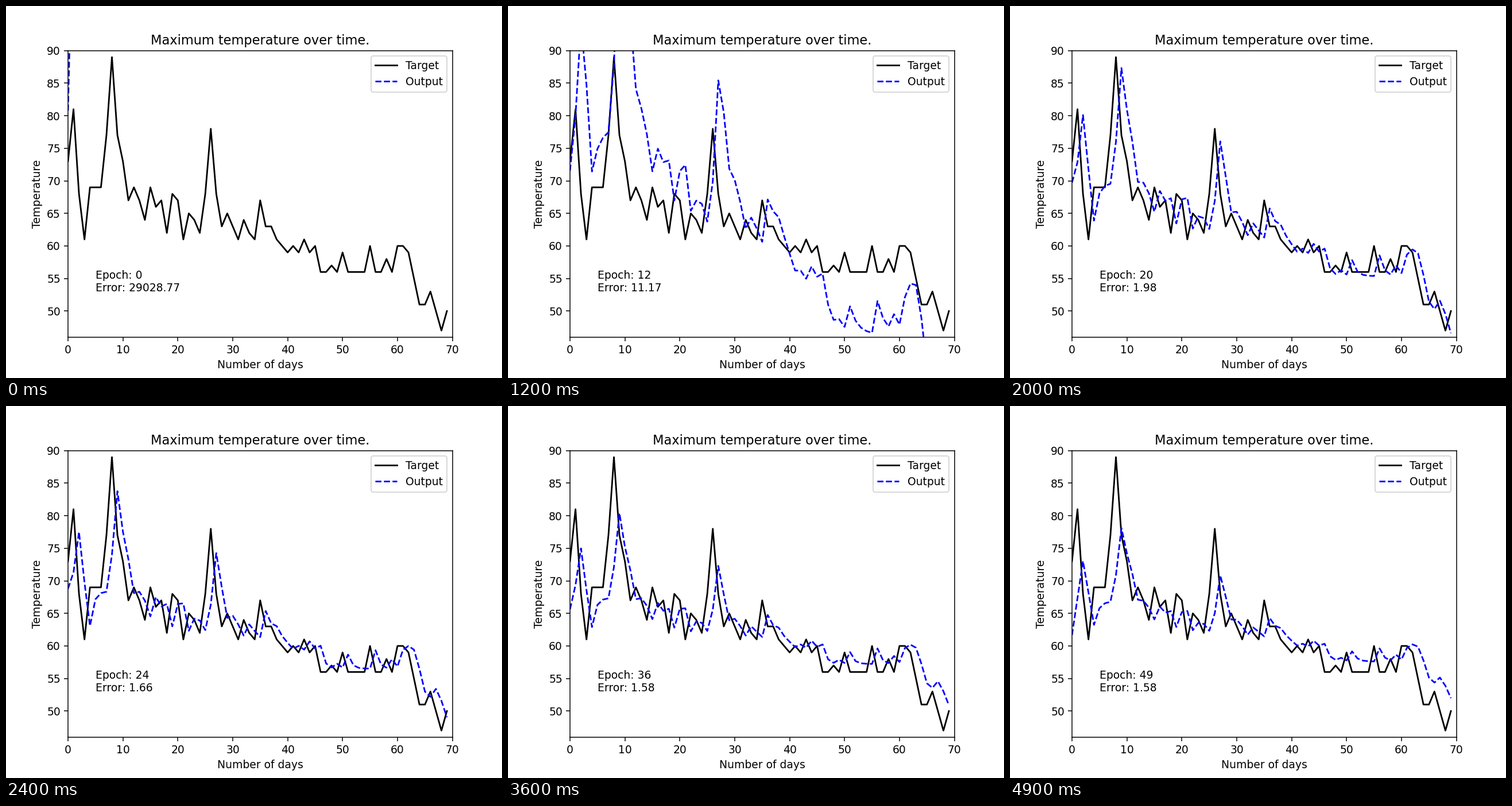
These frames come from a looping animation (864 by 648 pixels, 5 s). A matplotlib script:

```python
import numpy as np
import matplotlib.pyplot as plt
from matplotlib.animation import FuncAnimation

EPOCHS = 50
INTERVAL = 100

# Daily readings, the data set of the chart
TARGET = np.array([
    73, 81, 68, 61, 69, 69, 69, 77, 89, 77, 73, 67, 69, 67, 64, 69, 66, 67,
    62, 68, 67, 61, 65, 64, 62, 68, 78, 68, 63, 65, 63, 61, 64, 62, 61, 67,
    63, 63, 61, 60, 59, 60, 59, 61, 59, 60, 56, 56, 57, 56, 59, 56, 56, 56,
    56, 60, 56, 56, 58, 56, 60, 60, 59, 55, 51, 51, 53, 50, 47, 50])


def fade(epoch, center, width):
    """Smooth step from one down to zero."""
    return 1 / (1 + np.exp((epoch - center) / width))


def network_at(epoch):
    """Input weight, recurrent weight, fixed point and first output."""
    burst = np.exp(-epoch / 3)
    weight = 0.85 - 0.0071 * epoch + 0.67 * fade(epoch, 14.2, 3) + 1.836 * burst
    memory = 0.065 + 0.0047 * epoch + 0.53 * fade(epoch, 15, 4) + 0.437 * burst
    center = 61.6 + 1.05 * fade(epoch, 22, 3)
    first = 73.6 - 0.16 * epoch - 0.0017 * epoch**2 + 7.2 * burst
    return weight, memory, center, first


def predict(weight, memory, center, first):
    """One-step-ahead forecast of a linear recurrent unit."""
    output = [first]
    for value in TARGET[:-1]:
        output.append(center + weight * (value - center)
                      + memory * (output[-1] - center))
    return output


def error_at(epoch):
    """Training loss: a steep drop, a slower decline, then a plateau."""
    drop = 28924.41 * np.exp(-2 * epoch)
    decline = 101.79 * np.exp(-0.06573 * epoch - 0.011085 * epoch**2)
    return 1.5735 + drop + decline + np.exp(-epoch / 8)


plt.rcParams["font.family"] = "DejaVu Sans"
fig, ax = plt.subplots(figsize=(6.4, 4.8), dpi=135)
days = np.arange(len(TARGET))
ax.plot(days, TARGET, "k-", label="Target")
output_line, = ax.plot([], [], "b--", label="Output")
epoch_text = ax.text(5, 55, "")
error_text = ax.text(5, 53, "")
ax.set(xlim=(0, 70), ylim=(46, 90), xlabel="Number of days",
       ylabel="Temperature", title="Maximum temperature over time.")
ax.legend(loc="upper right")


def update(epoch):
    output_line.set_data(days, predict(*network_at(epoch)))
    epoch_text.set_text(f"Epoch: {epoch}")
    error_text.set_text(f"Error: {error_at(epoch):.2f}")
    return output_line, epoch_text, error_text


animation = FuncAnimation(fig, update, frames=EPOCHS, interval=INTERVAL,
                          repeat=True, repeat_delay=0)
plt.show()
```
